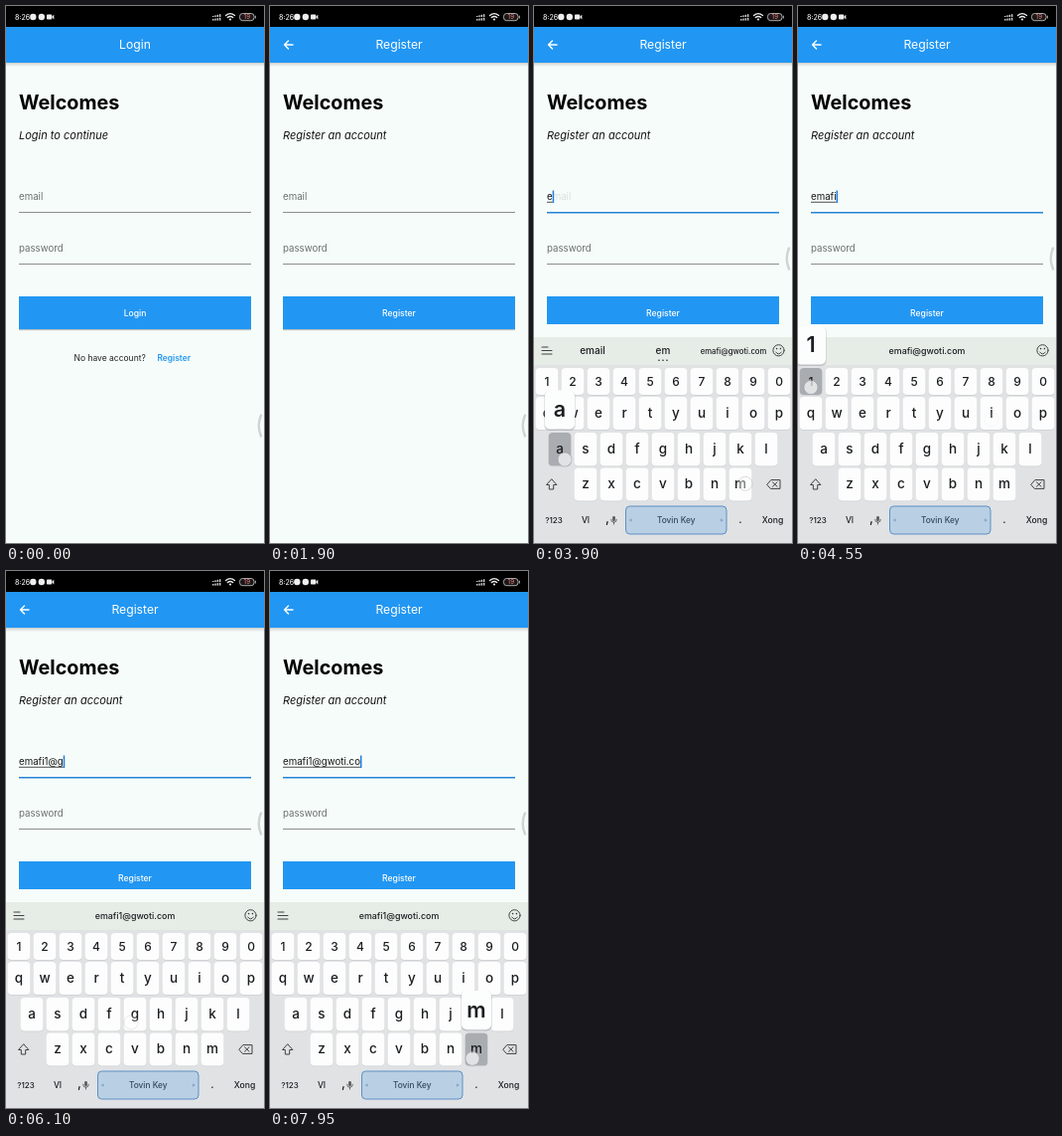
Recreate the animation shown at these times as an HTML page. Size 260 by 540 pixels, loop 8000 ms.

```html
<!DOCTYPE html>
<html lang="en">
<head>
<meta charset="utf-8">
<title>Login and register</title>
<style>
  html, body { margin: 0; width: 100%; height: 100%; overflow: hidden; background: #f6fcf9; }
  svg { display: block; width: 100%; height: 100%; }
  text { font-family: Inter, sans-serif; white-space: pre; }
  .kb text { font-weight: 500; fill: #1b1d20; }
  .line { fill: none; stroke: #3e4341; stroke-width: 1; stroke-linecap: round; stroke-linejoin: round; }
</style>
</head>
<body>
<svg id="stage" viewBox="0 0 260 540"></svg>
<script>
const LOOP = 8000, BLUE = '#2196f3', PAPER = '#f6fcf9';
const FADE_AT = 900, FOCUS_AT = 2570, SLIDE = 277, KB_HEIGHT = 207;
const HOST = '@gwoti.com';
const stage = document.getElementById('stage');

function add(parent, tag, attrs = {}, content) {
  const el = document.createElementNS('http://www.w3.org/2000/svg', tag);
  for (const name in attrs) el.setAttribute(name, attrs[name]);
  if (content !== undefined) el.textContent = content;
  parent.append(el);
  return el;
}
const group = (parent, attrs) => add(parent, 'g', attrs);
const rect = (p, x, y, width, height, fill, more) => add(p, 'rect', { x, y, width, height, fill, ...more });
const circle = (p, cx, cy, r, fill, more) => add(p, 'circle', { cx, cy, r, fill, ...more });
const path = (p, d, more) => add(p, 'path', { d, class: 'line', ...more });
const text = (p, s, x, y, size, more) => add(p, 'text', { x, y, 'font-size': size, ...more }, s);
const mid = (p, s, x, y, size, more) => text(p, s, x, y, size, { 'text-anchor': 'middle', ...more });
const show = (el, on) => el.setAttribute('opacity', +on);

// Pages
function makePage(title, subtitle, isLogin) {
  const g = group(stage);
  rect(g, 0, 20, 260, 520, PAPER);
  [.16, .1, .06, .03].forEach((a, i) => rect(g, 0, 57 + i, 260, 1, '#000', { opacity: a }));
  rect(g, 0, 20, 260, 37, BLUE);
  mid(g, title, 130, 43.4, 12.2, { fill: '#fff' });
  text(g, 'Welcomes', 13, 104, 19.8, { 'font-weight': 700 });
  text(g, subtitle, 13, 133.7, 11, { 'font-style': 'italic', fill: '#111' });
  g.hint = text(g, 'email', 13, 195.3, 9.7, { fill: '#6b706d' });
  text(g, 'password', 13, 247.3, 9.7, { fill: '#6b706d' });
  g.line = rect(g, 13, 207, 234, 1, '#8b908d');
  rect(g, 13, 259, 234, 1, '#8b908d');
  rect(g, 13, 293, 234, 33.5, '#000', { opacity: .1 });
  rect(g, 13, 293, 234, 33, '#000', { opacity: .15 });
  rect(g, 13, 292, 234, 33, BLUE);
  mid(g, title, 130, 311.7, 8.6, { fill: '#fff', 'font-weight': 500 });
  if (isLogin) {
    text(g, 'No have account?', 68.5, 357.4, 8.5, { fill: '#222' });
    text(g, 'Register', 152.5, 357.4, 8.4, { fill: BLUE, 'font-weight': 600 });
  } else {
    path(g, 'M23 39H14.5M18.5 35L14.5 39L18.5 43', { style: 'stroke:#fff;stroke-width:1.4' });
  }
  return g;
}

makePage('Login', 'Login to continue', true);
const register = makePage('Register', 'Register an account', false);
const clipBar = rect(stage, 0, 320, 260, 14, PAPER);
const typed = text(stage, '', 13, 195.3, 9.7, { fill: '#151515' });
const underline = rect(stage, 13, 196.8, 0, .8, '#222');
const cursor = rect(stage, 13, 185.5, 1.5, 12.5, '#2080dd');

// Status bar
rect(stage, 0, 0, 260, 21, '#000');
text(stage, '8:26', 9, 13.8, 7, { fill: '#eee', 'font-weight': 500 });
circle(stage, 27.3, 11, 3.2, '#eee');
circle(stage, 35.8, 11, 3.2, '#eee');
rect(stage, 41, 8.6, 5.2, 5, '#eee', { rx: .8 });
add(stage, 'path', { d: 'M46 11L48.3 8.8V13.4Z', fill: '#eee' });
for (let i = 0; i < 4; i++) {
  rect(stage, 208 + i * 2.3, 10 - i * .6, 1.5, 1 + i * .6, '#ccc');
  rect(stage, 208 + i * 2.3, 13 - i * .4, 1.5, 1.6 + i * .4, '#ccc');
}
path(stage, 'M221.5 9.6Q226 5.8 230.5 9.6M223.3 11.6Q226 9.4 228.7 11.6', { style: 'stroke:#eee;stroke-width:1.3' });
circle(stage, 226, 13.5, 1.1, '#eee');
rect(stage, 235.5, 7.5, 14.5, 7.2, '#1c1718', { rx: 3, stroke: '#bbb', 'stroke-width': .9 });
rect(stage, 250.8, 9.7, 1, 2.8, '#bbb');
mid(stage, '19', 242.8, 13.4, 6.2, { fill: '#f08a8a' });

// Keyboard
const kb = group(stage, { class: 'kb' });
rect(kb, 0, 333, 260, 207, '#e0e2e4');
rect(kb, 0, 333, 260, 28, '#e6ece6');
const rowTop = [364, 393, 429, 464.5, 500], rowHeight = [27, 33, 33.5, 33, 33];
const rowBase = [381.5, 413.8, 450, 485.3, 520.3];

function makeLayout(rows, bottom) {
  const layout = { g: group(kb), keys: {} };
  rows.forEach(([chars, left], row) => [...chars].forEach((label, i) => {
    const x = left + 26 * i, y = rowTop[row], h = rowHeight[row];
    rect(layout.g, x - 11.4, y + .7, 22.8, h, '#cdd0d2', { rx: 4 });
    rect(layout.g, x - 11.4, y, 22.8, h, '#fcfdfc', { rx: 4 });
    mid(layout.g, label, x, rowBase[row], row ? 13.5 : 12);
    layout.keys[label] = { x, row };
  }));
  for (const [label, x, size] of bottom) {
    mid(layout.g, label, x, 520.3, size);
    layout.keys[label] = { x, row: 4, flat: true };
  }
  return layout;
}

function spaceBar(g, right) {
  const w = right - 92.5, center = 92.5 + w / 2;
  rect(g, 92.5, 503, w, 28, '#b9d0e4', { rx: 4, stroke: '#5c8fc6', 'stroke-width': 1 });
  mid(g, 'Tovin Key', center, 520, 8.3, { style: 'fill:#37485c' });
  add(g, 'path', { d: `M98.5 515.3V518.7L95.7 517ZM${right - 6} 515.3V518.7L${right - 3} 517Z`, fill: '#7fa6cf' });
}

function mic(g, x, y, s) {
  const m = group(g, { transform: `translate(${x} ${y}) scale(${s})` });
  rect(m, -1.8, -5.5, 3.6, 7, '#555b58', { rx: 1.8 });
  path(m, 'M-3.8 -1Q-3.8 3 0 3Q3.8 3 3.8 -1M0 3V5.5');
}

const DIGITS = ['1234567890', 13];
const letters = makeLayout(
  [DIGITS, ['qwertyuiop', 13], ['asdfghjkl', 26], ['zxcvbnm', 52]],
  [['?123', 20, 8], ['VI', 52, 8.4], [',', 74, 13], ['.', 208, 11], ['Xong', 240.5, 8.6]]);
path(letters.g, 'M17.5 476L12.5 481.5H15.3V486H19.7V481.5H22.5Z');
mic(letters.g, 80.5, 517, .75);
spaceBar(letters.g, 194);

const symbols = makeLayout(
  [DIGITS, ['~`|·√π÷×¶∆', 13], ['@#$%&-+()/', 13], ['*"\':;!?', 52]],
  [['ABC', 20, 8], [',', 48, 13], ['_', 182, 11], ['.', 208, 11], ['Xong', 240.5, 8.6]]);
mid(symbols.g, '= \\ <', 18, 484, 7.4);
mid(symbols.g, '1 2', 78, 516, 7);
mid(symbols.g, '3 4', 78, 523.5, 7);
mic(symbols.g, 54.5, 517, .75);
spaceBar(symbols.g, 168);

path(kb, 'M235 481L238.8 476.6H248V485.4H238.8ZM240.5 478.8L245 483.2M245 478.8L240.5 483.2');

// Strip above the keys
circle(kb, 246.5, 346.3, 5.6, 'none', { class: 'line' });
path(kb, 'M243.7 348Q246.5 352 249.3 348');
circle(kb, 244.6, 344.6, .8, '#303432');
circle(kb, 248.4, 344.6, .8, '#303432');

const tools = group(kb);
for (let i = 0; i < 8; i++) circle(tools, 4.5 + (i % 4) * 4.3, 342 + Math.floor(i / 4) * 4, .8, '#303432');
path(tools, 'M8 350.5H14');
rect(tools, 0, 358.5, 21, 1.6, '#222');
path(tools, 'M35.5 341Q38.5 344 41.5 341L45.5 344.2L43.5 347L42 346V352H35V346L33.5 347L31.5 344.2Z');
path(tools, [0, 1, 2, 3, 4, 5].map(i => {
  const a = i * Math.PI / 3;
  return `${i ? 'L' : 'M'}${74 + 6 * Math.cos(a)} ${346.5 + 6 * Math.sin(a)}`;
}).join('') + 'Z');
circle(tools, 74, 346.5, 2.3, 'none', { class: 'line' });
path(tools, 'M105.5 341H111L114 344V352H105.5ZM107.7 347H112M107.7 349.5H111');
path(tools, 'M145 340.5V352.5M143 340.5H147M143 352.5H147M141.5 344L139 346.5L141.5 349M148.5 344L151 346.5L148.5 349M139 346.5H142.5M151 346.5H147.5');
mic(tools, 180.5, 346.5, 1);
circle(tools, 216, 346.3, 5.6, '#ee7b68');

const strip = group(kb);
path(strip, 'M8 343H14M8 346.5H18M8 350H18');
const words = [59, 130, 201].map(x => mid(strip, '', x, 349.7, 10));
const more = group(strip);
[-4, 0, 4].forEach(dx => circle(more, 130 + dx, 356.3, .8, '#222'));

// Long words shrink; the middle one keeps more room
function wordSize(word, isMiddle) {
  if (word.length < 10) return 10;
  if (isMiddle) return 8.9;
  return word.length > 15 ? 6.9 : 7.7;
}

const suggestions = [
  [3680, 'email', 'e', 'emafi' + HOST],
  [3850, 'email', 'em', 'emafi' + HOST],
  [3970, 'email', 'ema', 'emafi' + HOST],
  [4220, '', 'emafi' + HOST, ''],
  [4640, 'emafi10' + HOST, 'emafi1' + HOST, 'emafi123' + HOST],
  [5550, '', 'emafi1' + HOST, ''],
];

// Key presses: label, down, up, finger offset
const presses = [
  ['e', 3580, 3680], ['m', 3740, 3850, 5, 0], ['a', 3870, 3970, 5, 11],
  ['f', 4130, 4220], ['i', 4330, 4420], ['1', 4540, 4640],
  ['?123', 5010, 5110], ['@', 5450, 5550], ['ABC', 5700, 5800],
  ['g', 5930, 6010, -4, 9], ['w', 6380, 6470], ['o', 6610, 6700],
  ['t', 6850, 6940], ['i', 7060, 7150], ['.', 7340, 7430],
  ['c', 7540, 7630], ['o', 7700, 7790], ['m', 7890, 8000, -4, 10],
].map(([label, down, up, dx = 0, dy = 7]) => {
  const key = letters.keys[label] || symbols.keys[label];
  return { label, down, up, key, x: key.x + dx, y: rowBase[key.row] - 5 + dy };
});
const SYMBOLS_ON = 5110, SYMBOLS_OFF = 5800, INPUT_LAG = 70;

const overlay = group(stage, { class: 'kb' });
let shownPress;
function drawPress(press) {
  if (press === shownPress) return;
  shownPress = press;
  overlay.replaceChildren();
  if (!press || press.key.flat) return;
  const { x, row } = press.key, top = rowTop[row];
  rect(overlay, x - 11.4, top, 22.8, rowHeight[row], '#a9adb1', { rx: 4 });
  mid(overlay, press.label, x, rowBase[row], row ? 13.5 : 12);
  rect(overlay, x - 15.5, top - 42, 31, 40, '#9aa0a6', { rx: 5, opacity: .5 });
  rect(overlay, x - 15, top - 42.5, 30, 39, '#fcfdfd', { rx: 5 });
  mid(overlay, press.label, x, top - 16, 21.5, { style: 'font-weight:600' });
}

const handle = path(stage, 'M257 411.5Q252.5 422 257 432.5', { style: 'stroke:#cfd3d1;stroke-width:2.4' });

const touches = [
  { x: 169, y: 356, down: 720, up: 830 },
  { x: 100, y: 193, down: 2380, up: 2480 },
  ...presses,
];
for (const p of touches) {
  p.dot = circle(stage, p.x, p.y, 7, '#fff', { 'fill-opacity': .65, stroke: '#8d9296', 'stroke-opacity': .6, 'stroke-width': .8 });
}

const clamp = v => Math.min(1, Math.max(0, v));

function render(t) {
  const focused = t >= FOCUS_AT;
  show(register, clamp((t - FADE_AT) / 300));
  show(clipBar, focused);
  register.line.setAttribute('fill', focused ? '#2583d8' : '#8b908d');
  register.line.setAttribute('height', focused ? 1.5 : 1);
  handle.setAttribute('transform', `translate(0 ${focused ? -168 : 0})`);

  const left = (1 - clamp((t - FOCUS_AT) / SLIDE)) ** 3;
  kb.setAttribute('transform', `translate(0 ${KB_HEIGHT * left})`);
  show(kb, focused);
  const symbolic = t >= SYMBOLS_ON && t < SYMBOLS_OFF;
  show(symbols.g, symbolic);
  show(letters.g, !symbolic);

  const current = suggestions.filter(s => t >= s[0]).pop();
  show(tools, !current);
  show(strip, !!current);
  if (current) {
    words.forEach((el, i) => {
      const word = current[i + 1];
      el.textContent = word;
      el.setAttribute('font-size', wordSize(word, i === 1));
    });
    show(more, current[2].length < 4);
  }

  const entered = presses.filter(p => p.label.length === 1 && t >= p.up + INPUT_LAG);
  typed.textContent = entered.map(p => p.label).join('');
  const width = entered.length ? typed.getComputedTextLength() : 0;
  underline.setAttribute('width', width);
  cursor.setAttribute('x', 13 + width);
  const changed = entered.length ? entered[entered.length - 1].up + INPUT_LAG : 2800;
  show(cursor, t >= changed && Math.floor((t - changed) / 500) % 2 === 0);
  show(register.hint, 1 - clamp((t - presses[0].up - INPUT_LAG) / 190));

  drawPress(presses.find(p => t >= p.down && t < p.up));
  for (const p of touches) show(p.dot, t < p.down ? 0 : 1 - clamp((t - p.up) / 150));
}

const start = performance.now();
function tick() {
  render((performance.now() - start) % LOOP);
  requestAnimationFrame(tick);
}
tick();
</script>
</body>
</html>
```
